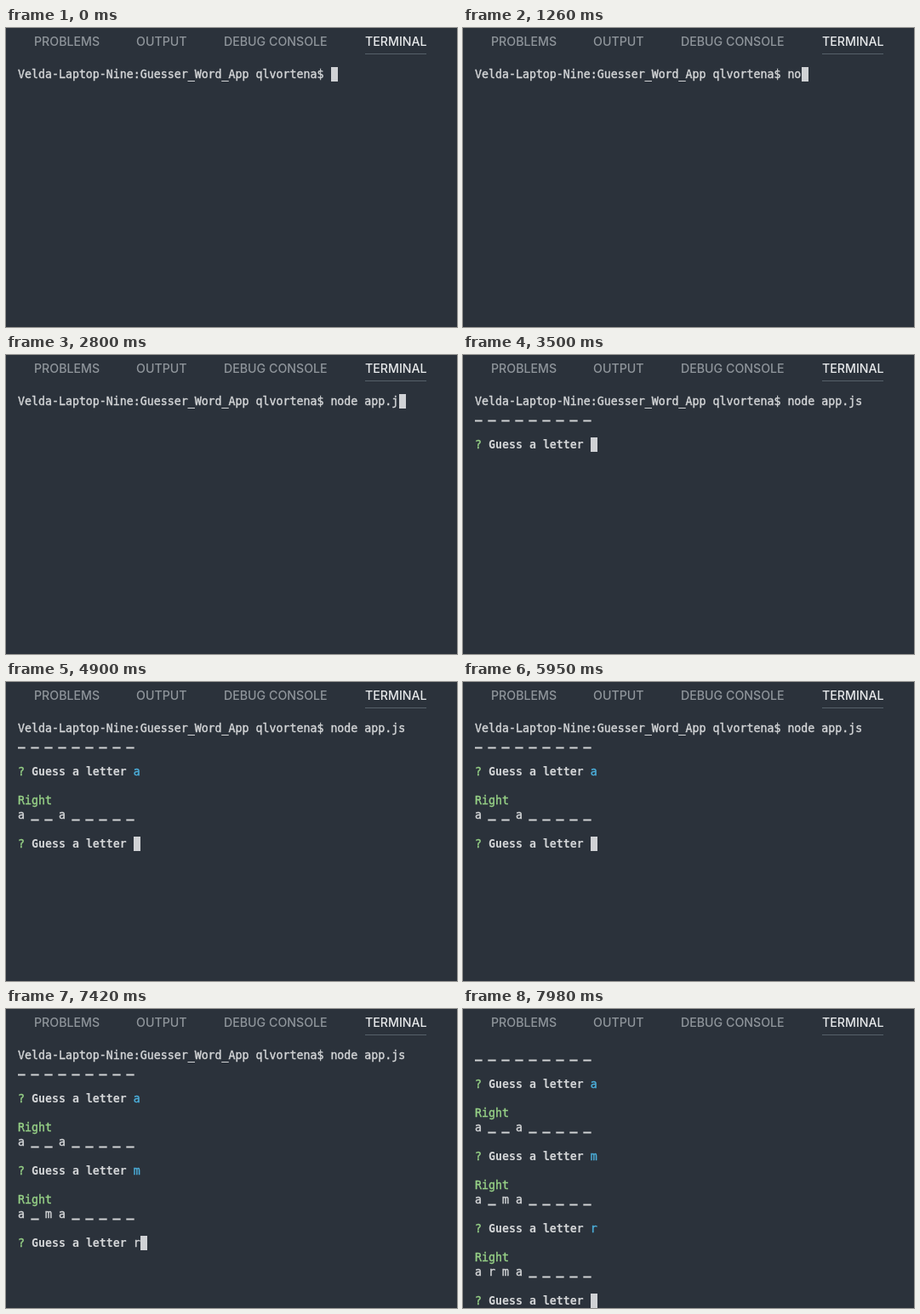
These frames come from a looping animation (530 px wide and 352 px high, 8000 ms). An HTML page:

```html
<!DOCTYPE html>
<html lang="en">
<head>
<meta charset="utf-8">
<title>Terminal word game</title>
<style>
  html, body { margin: 0; width: 100%; height: 100%; overflow: hidden; background: #2b323b; }
  #stage { position: relative; width: 530px; height: 352px; overflow: hidden; background: #2b323b; }
  .tab {
    position: absolute; top: 7px; line-height: 18px; white-space: pre;
    font-family: Inter, sans-serif; font-size: 14.2px; font-weight: 500; color: #8f959b;
  }
  .active { color: #e8eaec; }
  #rule { position: absolute; left: 422px; top: 30px; width: 72px; height: 1px; background: #56616a; }
  #screen {
    position: absolute; left: 14px; top: 46px; width: 516px; height: 306px; overflow: hidden;
    font-family: "DejaVu Sans Mono", monospace; font-size: 13.288px; line-height: 17px;
    font-variant-ligatures: none; color: #d3d5d7; -webkit-text-stroke: 0.4px;
  }
  .row { height: 17px; white-space: pre; }
  .bold { font-weight: bold; -webkit-text-stroke: 0; }
  .green { color: #96d086; }
  .blue { color: #4cb0dc; }
  .blank { position: relative; top: -2px; -webkit-text-stroke: 1.4px; }
  #cursor { position: absolute; width: 8px; height: 17px; background: #d0d2d5; }
</style>
</head>
<body>
<div id="stage">
  <div class="tab" style="left:33px">PROBLEMS</div>
  <div class="tab" style="left:153px">OUTPUT</div>
  <div class="tab" style="left:256px">DEBUG CONSOLE</div>
  <div class="tab active" style="left:422px">TERMINAL</div>
  <div id="rule"></div>
  <div id="screen"></div>
</div>
<script>
const LOOP = 8000, CELL = 8, LINE = 17, ROWS = 18;
const PROMPT = 'Velda-Laptop-Nine:Guesser_Word_App qlvortena$ ';
const COMMAND = 'node app.js';
const KEY_TIMES = [1050, 1260, 1470, 1680, 1890, 2100, 2310, 2450, 2660, 2800, 2940];
const RUN = 3150, READY = 3500;
const GUESSES = [
  { key: 'a', typed: 3640, enter: 4200, word: 'a__a_____' },
  { key: 'm', typed: 6300, enter: 6580, word: 'a_ma_____' },
  { key: 'r', typed: 7350, enter: 7770, word: 'arma_____' }
];

const screen = document.getElementById('screen');
const letters = word => [...word].flatMap(c => [[c, c === '_' ? 'blank' : ''], [' ']]);
const question = (...answer) => [['? ', 'green'], ['Guess a letter ', 'bold'], ...answer];

// Each row is a list of [text, class] pieces.
function rowsAt(t) {
  const count = KEY_TIMES.filter(k => t >= k).length;
  const rows = [[[PROMPT + COMMAND.slice(0, count)]]];
  if (t < RUN) return rows;
  if (t < READY) return [...rows, []];
  rows.push(letters('_________'), []);
  for (const g of GUESSES) {
    if (t < g.enter) {
      rows.push(question([t >= g.typed ? g.key : '']));
      return rows;
    }
    rows.push(question([g.key, 'blue']), [], [['Right', 'green']], letters(g.word), []);
  }
  rows.push(question());
  return rows;
}

function element(tag, cls, text = '') {
  const el = document.createElement(tag);
  if (cls) el.className = cls;
  el.textContent = text;
  return el;
}

function draw(rows) {
  const visible = rows.slice(-ROWS);
  const nodes = visible.map(row => {
    const el = element('div', 'row');
    el.append(...row.map(([text, cls]) => element('span', cls, text)));
    return el;
  });
  const cursor = element('div');
  cursor.id = 'cursor';
  cursor.style.left = nodes.at(-1).textContent.length * CELL + 'px';
  cursor.style.top = (visible.length - 1) * LINE + 'px';
  screen.replaceChildren(...nodes, cursor);
}

const start = performance.now();
let shown = '';
function tick() {
  const rows = rowsAt((performance.now() - start) % LOOP);
  const state = JSON.stringify(rows);
  if (state !== shown) {
    shown = state;
    draw(rows);
  }
  requestAnimationFrame(tick);
}
tick();
</script>
</body>
</html>
```
